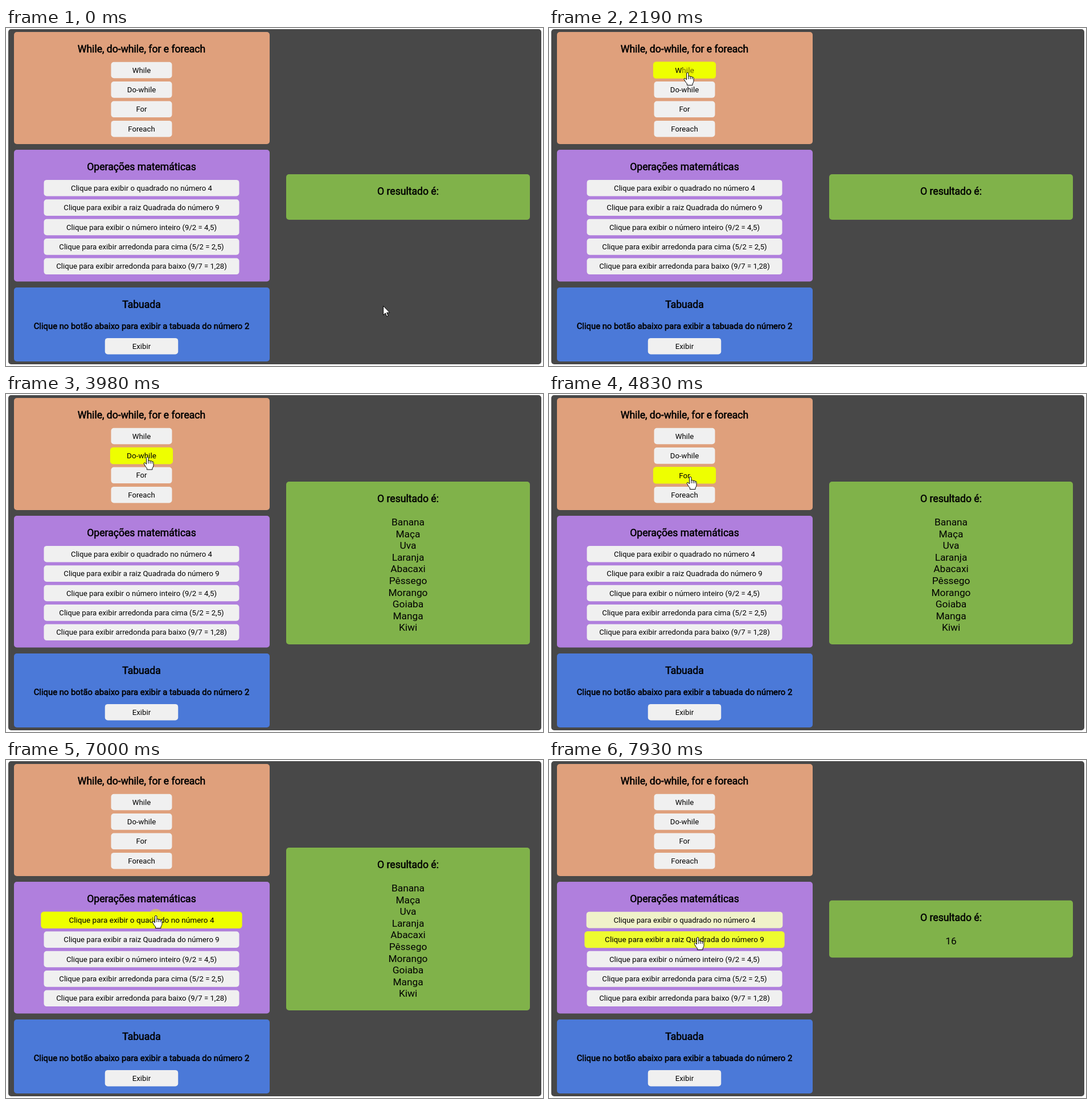
An HTML page for the animation above (7990 ms loop, 943 by 594 pixels).

```html
<!DOCTYPE html>
<html lang="pt-BR">
<head>
<meta charset="utf-8">
<title>Estruturas de repetição</title>
<style>
  html, body { margin: 0; width: 100%; height: 100%; overflow: hidden; background: #fff; }
  svg { display: block; width: 943px; height: 594px; }
  text { font-family: Roboto, "Liberation Sans", sans-serif; text-anchor: middle; }
  .button { font-size: 13.2px; }
  .title { font-size: 17.6px; }
  .note { font-size: 14.8px; }
  .title, .note { stroke: #000; stroke-width: .55px; }
  .line { font-size: 17.3px; }
  .cursor { fill: #fff; stroke: #000; stroke-linejoin: round; }
</style>
</head>
<body>
<svg viewBox="0 0 943 594"></svg>
<script>
const LOOP = 7990;
const HOVER_TIME = 450;
const FRUITS = ["Banana", "Maça", "Uva", "Laranja", "Abacaxi", "Pêssego", "Morango", "Goiaba", "Manga", "Kiwi"];
const svg = document.querySelector("svg");

function add(parent, tag, attrs, text = "") {
  const node = document.createElementNS("http://www.w3.org/2000/svg", tag);
  for (const name in attrs) node.setAttribute(name, attrs[name]);
  node.textContent = text;
  parent.append(node);
  return node;
}

const box = (parent, x, y, width, height, fill, rx = 5) =>
  add(parent, "rect", { x, y, width, height, rx, fill });

const label = (parent, style, x, y, text) => add(parent, "text", { class: style, x, y }, text);

function button(cy, width, text) {
  const group = add(svg, "g", {});
  const face = box(group, 238 - width / 2, cy - 14.3, width, 28.6, "#f0f0f0");
  label(group, "button", 238, cy + 4.6, text);
  return { group, face, cy };
}

function panel(y, height, fill, title) {
  box(svg, 14, y, 449, height, fill);
  label(svg, "title", 238, y + 36.2, title);
}

box(svg, 4, 2, 936, 589, "#484848");
panel(7, 197, "#dfa07c", "While, do-while, for e foreach");
panel(214, 231.5, "#b07fdd", "Operações matemáticas");
panel(456, 130, "#4b79d8", "Tabuada");
label(svg, "note", 238, 529.3, "Clique no botão abaixo para exibir a tabuada do número 2");

const loops = ["While", "Do-while", "For", "Foreach"].map((text, i) => button(74 + i * 34.4, 107, text));
const sums = [
  "Clique para exibir o quadrado no número 4",
  "Clique para exibir a raiz Quadrada do número 9",
  "Clique para exibir o número inteiro (9/2 = 4,5)",
  "Clique para exibir arredonda para cima (5/2 = 2,5)",
  "Clique para exibir arredonda para baixo (9/7 = 1,28)"
].map((text, i) => button(281.2 + i * 34.4, 343, text));
button(559.2, 128.5, "Exibir");

function resultPanel(lines) {
  const group = add(svg, "g", {});
  const height = 80 + lines.length * 20.6;
  const top = 297 - height / 2;
  box(group, 492, top, 428, height, "#80b24a");
  label(group, "title", 706, top + 36.4, "O resultado é:");
  lines.forEach((text, i) => label(group, "line", 706, top + 77 + i * 20.6, text));
  return group;
}

const results = [
  { from: 0, to: 2260, group: resultPanel([]) },
  { from: 2260, to: 7140, group: resultPanel(FRUITS) },
  { from: 7140, to: LOOP, group: resultPanel(["16"]) }
];

const hovers = [
  { target: loops[0], from: 1350, to: 2890 },
  { target: loops[1], from: 2910, to: 4040 },
  { target: loops[2], from: 4060, to: 4960 },
  { target: loops[3], from: 4980, to: 5930 },
  { target: sums[0], from: 6170, to: 7690 },
  { target: sums[1], from: 7705, to: LOOP }
];

const clicks = [[2190, 2260], [3450, 3580], [4700, 4800], [5690, 5820], [7000, 7140]];

// Pointer path: time, x, y
const path = [
  [0, 662, 488], [540, 662, 488], [660, 632, 465], [740, 590, 418], [820, 525, 358],
  [1000, 322, 165], [1130, 297, 133], [1270, 297, 98], [1390, 275, 82], [1600, 243, 78],
  [2800, 243, 78], [3150, 248, 107], [3950, 248, 107], [4300, 248, 145],
  [4850, 248, 145], [5200, 251, 182], [5840, 251, 182], [6260, 263, 273],
  [7480, 263, 273], [7880, 261, 311], [LOOP, 261, 311]
];

const halo = add(svg, "circle", { r: 11.3, fill: "#ebeb00", "fill-opacity": .5 });
const pointer = add(svg, "g", { class: "cursor" });
const arrow = add(pointer, "path", { d: "M.5 .5V16.5L4.2 13 6.8 19 9.2 18 6.6 12.2H11.8Z" });
const hand = add(pointer, "path", {
  d: "M-1.5 13V2Q-1.5 .5 .2 .5T1.9 2V7.5Q2 6.3 3.6 6.4T5.2 8Q5.4 7 6.9 7.2T8.3 8.8Q8.6 8 9.8 8.3T11 10V15.5" +
     "Q11 17.5 9 20V22.5H-.5V20Q-3 18 -5.6 12.5Q-6.3 10.7 -4.9 10.4T-1.5 13ZM1.9 7.5V12M5.2 8V12M8.3 9V12"
});

const show = (node, visible) => node.setAttribute("visibility", visible ? "visible" : "hidden");
const mix = (a, b, k) => a + (b - a) * k;

// The CSS "ease" curve, cubic-bezier(.25, .1, .25, 1)
function ease(x) {
  if (x <= 0) return 0;
  if (x >= 1) return 1;
  const bezier = (u, a, b) => 3 * (1 - u) ** 2 * u * a + 3 * (1 - u) * u * u * b + u ** 3;
  let low = 0, high = 1;
  for (let i = 0; i < 16; i++) {
    const middle = (low + high) / 2;
    if (bezier(middle, .25, .25) < x) low = middle;
    else high = middle;
  }
  return bezier(low, .1, 1);
}

function pointerAt(t) {
  const next = path.findIndex(point => point[0] > t);
  const [t0, x0, y0] = path[next - 1], [t1, x1, y1] = path[next];
  const k = (t - t0) / (t1 - t0);
  return [mix(x0, x1, k), mix(y0, y1, k)];
}

function draw(t) {
  for (const { target, from, to } of hovers) {
    const k = ease((t - from) / HOVER_TIME) * (1 - ease((t - to) / HOVER_TIME));
    const scale = 1 + .03 * k;
    target.group.setAttribute("transform",
      `translate(238 ${target.cy}) scale(${scale}) translate(-238 ${-target.cy})`);
    target.face.setAttribute("fill", `rgb(${mix(240, 238, k)} ${mix(240, 255, k)} ${mix(240, 0, k)})`);
  }
  for (const { from, to, group } of results) show(group, t >= from && t < to);

  const [x, y] = pointerAt(t);
  const hovering = hovers.some(({ from, to }) => t >= from && t < to);
  pointer.setAttribute("transform", `translate(${x} ${y})`);
  show(hand, hovering);
  show(arrow, !hovering);
  halo.setAttribute("cx", x);
  halo.setAttribute("cy", y);
  show(halo, clicks.some(([from, to]) => t >= from && t < to));
}

const start = performance.now();
function tick() {
  draw((performance.now() - start) % LOOP);
  requestAnimationFrame(tick);
}
tick();
</script>
</body>
</html>
```
